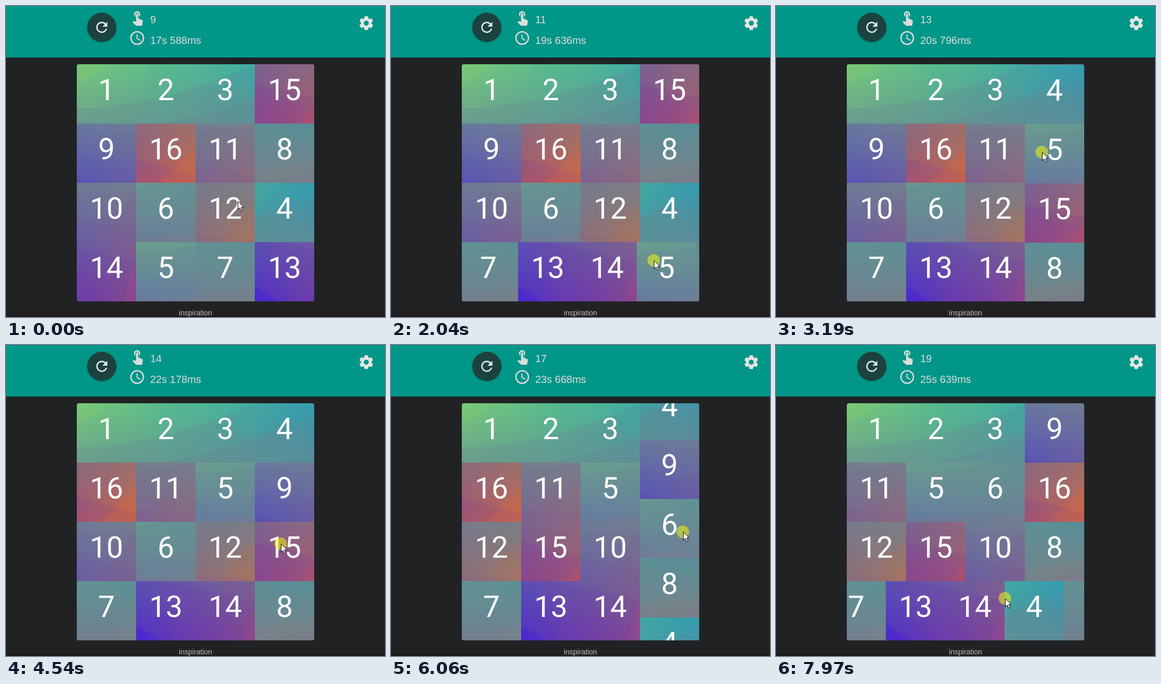
An HTML page with a canvas for the animation above (8000 ms loop, 728x598 px).

```html
<!DOCTYPE html>
<html lang="en">
<head>
<meta charset="utf-8">
<title>Sliding number puzzle</title>
<style>
  html, body { margin: 0; width: 100%; height: 100%; overflow: hidden; background: #212224; }
  canvas { display: block; }
</style>
</head>
<body>
<canvas id="stage" width="728" height="598"></canvas>
<script>
const LOOP = 8000, FRAME = 46, CELL = 114, SIZE = 4 * CELL, LEFT = 136, TOP = 112;
const SETTLE = 300;
const ctx = document.getElementById('stage').getContext('2d');

const START = [
  [1, 2, 3, 15],
  [9, 16, 11, 8],
  [10, 6, 12, 4],
  [14, 5, 7, 13]
];

// Pointer path: time, x, y
const POINTER = [
  [0, 445, 375], [490, 283, 489], [510, 283, 489], [1650, 502, 489], [2040, 505, 489],
  [2080, 505, 489], [2240, 511, 508], [2260, 511, 508], [3050, 511, 284], [3190, 511, 281],
  [3400, 511, 281], [3900, 398, 281], [3960, 398, 281], [4450, 528, 382], [4540, 528, 382],
  [4980, 296, 378], [5190, 296, 375], [5330, 353, 367], [5780, 561, 403], [5900, 561, 403],
  [6180, 561, 291], [6260, 561, 291], [6570, 456, 291], [6660, 456, 291], [7450, 479, 455],
  [7560, 479, 487], [7960, 440, 487], [8000, 440, 487]
];

const DRAGS = [
  { row: 3, press: 500, release: 2060, cells: 2 },
  { col: 3, press: 2260, release: 3250, cells: -2 },
  { row: 1, press: 3400, release: 3950, cells: -1 },
  { row: 2, press: 4500, release: 5190, cells: -2 },
  { col: 3, press: 5900, release: 6200, cells: -1 },
  { row: 1, press: 6260, release: 6600, cells: -1 },
  { row: 3, press: 7565, release: 9000, cells: -1 }
];

// Stopwatch readings: time, elapsed ms
const WATCH = [
  [0, 17588], [2040, 19636], [3190, 20796], [4540, 22178],
  [5330, 22939], [6630, 24312], [7970, 25639], [8016, 25685]
];

const smooth = u => u * u * (3 - 2 * u);
const mix = (a, b, u) => a + (b - a) * u;
const mod = (a, n) => ((a % n) + n) % n;

function segment(keys, t) {
  let i = 0;
  while (i < keys.length - 2 && t >= keys[i + 1][0]) i++;
  const [a, b] = [keys[i], keys[i + 1]];
  return { a, b, u: (t - a[0]) / (b[0] - a[0]) };
}

function pointerAt(t) {
  const { a, b, u } = segment(POINTER, t);
  return { x: mix(a[1], b[1], smooth(u)), y: mix(a[2], b[2], smooth(u)) };
}

function watchAt(t) {
  const { a, b, u } = segment(WATCH, t);
  return Math.round(mix(a[1], b[1], u));
}

function makeCanvas(w, h) {
  const c = document.createElement('canvas');
  c.width = w;
  c.height = h;
  return c;
}

// Four-corner gradient overlaid with translucent arcs and rays
function paintPicture() {
  const canvas = makeCanvas(SIZE, SIZE), g = canvas.getContext('2d');
  const corners = [[118, 200, 120], [45, 165, 178], [76, 46, 204], [200, 100, 76]];
  for (let y = 0; y < SIZE; y++) {
    const edge = k => `rgb(${corners[k].map((c, i) => mix(c, corners[k + 2][i], y / SIZE))})`;
    const fill = g.createLinearGradient(0, 0, SIZE, 0);
    fill.addColorStop(0, edge(0));
    fill.addColorStop(1, edge(1));
    g.fillStyle = fill;
    g.fillRect(0, y, SIZE, 1);
  }

  // Left, control and right heights of each arc, then its tint
  const arcs = [
    [86, 77, -60, '100,110,150', .17],
    [136, 122, 20, '110,110,150', .13],
    [184, 178, 146, '110,120,160', .13],
    [215, 228, 185, '150,115,120', .1],
    [234, 267, 205, '115,95,160', .13],
    [285, 314, 340, '110,80,160', .1],
    [332, 374, 440, '105,50,170', .15]
  ];
  for (const [y0, cy, y1, rgb, alpha] of arcs) {
    const from = Math.min(y0, y1), fill = g.createLinearGradient(0, from, 0, Math.max(y0, y1) + 90);
    fill.addColorStop(0, `rgba(${rgb},${alpha})`);
    fill.addColorStop(.5, `rgba(${rgb},${alpha})`);
    fill.addColorStop(1, `rgba(${rgb},0)`);
    g.fillStyle = fill;
    g.fill(new Path2D(`M0 ${y0}Q228 ${cy} 456 ${y1}V456H0Z`));
  }

  const rays = [
    ['M0 0H70L0 40Z', 'rgba(130,205,100,.2)'],
    ['M136 0H200Q204 66 165 114Q150 60 136 0Z', 'rgba(70,180,150,.12)'],
    ['M300 42L342 0H400L342 68Z', 'rgba(50,180,160,.15)'],
    ['M342 40L390 0H456V60Q400 30 342 70Z', 'rgba(40,160,185,.15)'],
    ['M228 245L153 342L228 380Z', 'rgba(130,80,145,.15)'],
    ['M228 330Q300 270 342 262V342H228Z', 'rgba(140,90,140,.13)'],
    ['M400 342Q405 290 456 268V342Z', 'rgba(185,105,85,.18)'],
    ['M0 428L47 456H0Z', 'rgba(70,30,215,.4)'],
    ['M28 342L72 456H150L114 342Z', 'rgba(120,65,165,.12)'],
    ['M205 456Q212 410 228 388V456Z', 'rgba(165,70,135,.25)'],
    ['M228 382L300 415L342 430V456H228Z', 'rgba(150,65,140,.14)'],
    ['M310 456L342 424V456Z', 'rgba(200,80,90,.25)'],
    ['M390 456L456 386V456Z', 'rgba(215,105,55,.22)']
  ];
  for (const [path, color] of rays) {
    g.fillStyle = color;
    g.fill(new Path2D(path));
  }
  return canvas;
}

function paintTiles(picture) {
  return Array.from({ length: 16 }, (_, i) => {
    const tile = makeCanvas(CELL, CELL), g = tile.getContext('2d');
    g.drawImage(picture, -(i % 4) * CELL, -Math.floor(i / 4) * CELL);
    g.font = '57px Roboto, sans-serif';
    g.textAlign = 'center';
    g.fillStyle = '#fff';
    g.fillText(i + 1, CELL / 2, 69);
    return tile;
  });
}

const tiles = paintTiles(paintPicture());

function rotate(grid, { row, col }, cells) {
  const at = i => row === undefined ? [i, col] : [row, i];
  const line = [0, 1, 2, 3].map(i => grid[at(i)[0]][at(i)[1]]);
  line.forEach((n, i) => {
    const [r, c] = at(mod(i + cells, 4));
    grid[r][c] = n;
  });
}

function dragOffset(drag, t) {
  const axis = drag.row === undefined ? 'y' : 'x';
  return pointerAt(Math.min(t, drag.release))[axis] - pointerAt(drag.press)[axis];
}

// Replays all drags up to time t
function stateAt(t) {
  const grid = START.map(r => r.slice());
  let moves = 9, active = null, offset = 0, pressed = false;
  DRAGS.forEach((drag, i) => {
    if (t < drag.press) return;
    const pulled = dragOffset(drag, t);
    const next = DRAGS[i + 1] ? DRAGS[i + 1].press : Infinity;
    moves += Math.floor(Math.abs(pulled) / CELL + 2 / 3);
    if (t >= Math.min(drag.release + SETTLE, next)) {
      rotate(grid, drag, drag.cells);
      return;
    }
    const rest = 1 - Math.max(0, t - drag.release) / SETTLE;
    active = drag;
    offset = mix(drag.cells * CELL, pulled, rest * rest);
    pressed = t < drag.release;
  });
  return { grid, moves, active, offset: Math.round(offset), pressed };
}

function drawBoard({ grid, active, offset }) {
  ctx.save();
  ctx.translate(LEFT, TOP);
  ctx.beginPath();
  ctx.roundRect(0, 0, SIZE, SIZE, 4);
  ctx.clip();
  grid.forEach((line, r) => line.forEach((n, c) => {
    const tile = tiles[n - 1];
    let x = c * CELL, y = r * CELL;
    if (active && active.row === r) {
      x = mod(x + offset, SIZE);
      ctx.drawImage(tile, x - SIZE, y);
    } else if (active && active.col === c) {
      y = mod(y + offset, SIZE);
      ctx.drawImage(tile, x, y - SIZE);
    }
    ctx.drawImage(tile, x, y);
  }));
  ctx.restore();
}

const REFRESH = new Path2D('M17.65 6.35C16.2 4.9 14.21 4 12 4c-4.42 0-7.99 3.58-7.99 8s3.57 8 7.99 8c3.73 0 6.84-2.55 7.73-6h-2.08c-.82 2.33-3.04 4-5.65 4-3.31 0-6-2.69-6-6s2.69-6 6-6c1.66 0 3.14.69 4.22 1.78L13 11h7V4z');
const TOUCH = new Path2D('M9 11.24V7.5C9 6.12 10.12 5 11.5 5S14 6.12 14 7.5v3.74c1.21-.81 2-2.18 2-3.74C16 5.01 13.99 3 11.5 3S7 5.01 7 7.5c0 1.56.79 2.93 2 3.74zM18.84 15.87l-4.54-2.26c-.17-.07-.35-.11-.54-.11H13v-6c0-.83-.67-1.5-1.5-1.5S10 6.67 10 7.5v10.74l-3.43-.72c-.4-.08-.75.02-1.03.3l-.79.8 4.94 4.94c.27.27.65.44 1.06.44h6.79c.75 0 1.33-.55 1.44-1.28l.75-5.27c.1-.7-.3-1.3-.89-1.58z');
const ARROW = new Path2D('M.5 .5V16.5L4.2 13L7 19.2L9.6 18L6.9 12H11.8Z');

function icon(path, x, y, color) {
  ctx.save();
  ctx.translate(x, y);
  ctx.scale(4 / 3, 4 / 3);
  ctx.fillStyle = color;
  ctx.fill(path);
  ctx.restore();
}

function disc(x, y, r, color) {
  ctx.fillStyle = color;
  ctx.beginPath();
  ctx.arc(x, y, r, 0, 2 * Math.PI);
  ctx.fill();
}

function drawClock(x, y) {
  ctx.strokeStyle = '#dcdcdc';
  ctx.lineWidth = 2.6;
  ctx.beginPath();
  ctx.arc(x, y, 12, 0, 2 * Math.PI);
  ctx.stroke();
  ctx.lineWidth = 2;
  ctx.stroke(new Path2D(`M${x - .3} ${y - 6.7}V${y + .8}L${x + 6} ${y + 4.6}`));
}

function drawGear(x, y) {
  ctx.save();
  ctx.translate(x, y);
  disc(0, 0, 9.6, '#e4e4e4');
  for (let i = 0; i < 6; i++) {
    ctx.fill(new Path2D('M-4.6 -8L-3 -13.3H3L4.6 -8Z'));
    ctx.rotate(Math.PI / 3);
  }
  disc(0, 0, 4.8, '#009688');
  ctx.restore();
}

function text(str, x, y, size, color, align = 'left') {
  ctx.font = `${size}px "Liberation Sans", Arial, sans-serif`;
  ctx.textAlign = align;
  ctx.fillStyle = color;
  ctx.fillText(str, x, y);
}

function drawHeader(moves, ms) {
  ctx.fillStyle = '#009688';
  ctx.fillRect(0, 0, 728, 99);
  ctx.save();
  ctx.shadowColor = 'rgba(0,0,0,.3)';
  ctx.shadowBlur = 3;
  ctx.shadowOffsetY = 1;
  disc(184, 41, 28, '#1c423f');
  ctx.restore();
  icon(REFRESH, 168, 25, '#e8e8e8');
  icon(TOUCH, 236.5, 6, '#dcdcdc');
  drawClock(252, 61.5);
  drawGear(692, 33);
  text(moves, 277, 33, 20, '#dcdcdc');
  text(`${Math.floor(ms / 1000)}s ${ms % 1000}ms`, 277, 73, 20, '#dcdcdc');
}

function drawPointer({ x, y }, pressed) {
  x = Math.round(x);
  y = Math.round(y);
  if (pressed) disc(x - .5, y, 12, 'rgba(255,255,0,.5)');
  ctx.save();
  ctx.translate(x, y);
  ctx.fillStyle = '#fff';
  ctx.strokeStyle = '#000';
  ctx.lineWidth = 1;
  ctx.fill(ARROW);
  ctx.stroke(ARROW);
  ctx.restore();
}

function draw(time) {
  const { a } = segment(WATCH, time);
  const t = a[0] + Math.floor((time - a[0]) / FRAME) * FRAME;
  const state = stateAt(t);
  ctx.fillStyle = '#212224';
  ctx.fillRect(0, 0, 728, 598);
  ctx.fillStyle = '#1f1b1c';
  ctx.fillRect(0, 594, 728, 4);
  drawHeader(state.moves, watchAt(t));
  drawBoard(state);
  text('inspiration', 364, 595, 14, '#bdbdbd', 'center');
  drawPointer(pointerAt(t), state.pressed);
}

const began = performance.now();
function tick() {
  draw((performance.now() - began) % LOOP);
  requestAnimationFrame(tick);
}
tick();
</script>
</body>
</html>
```
